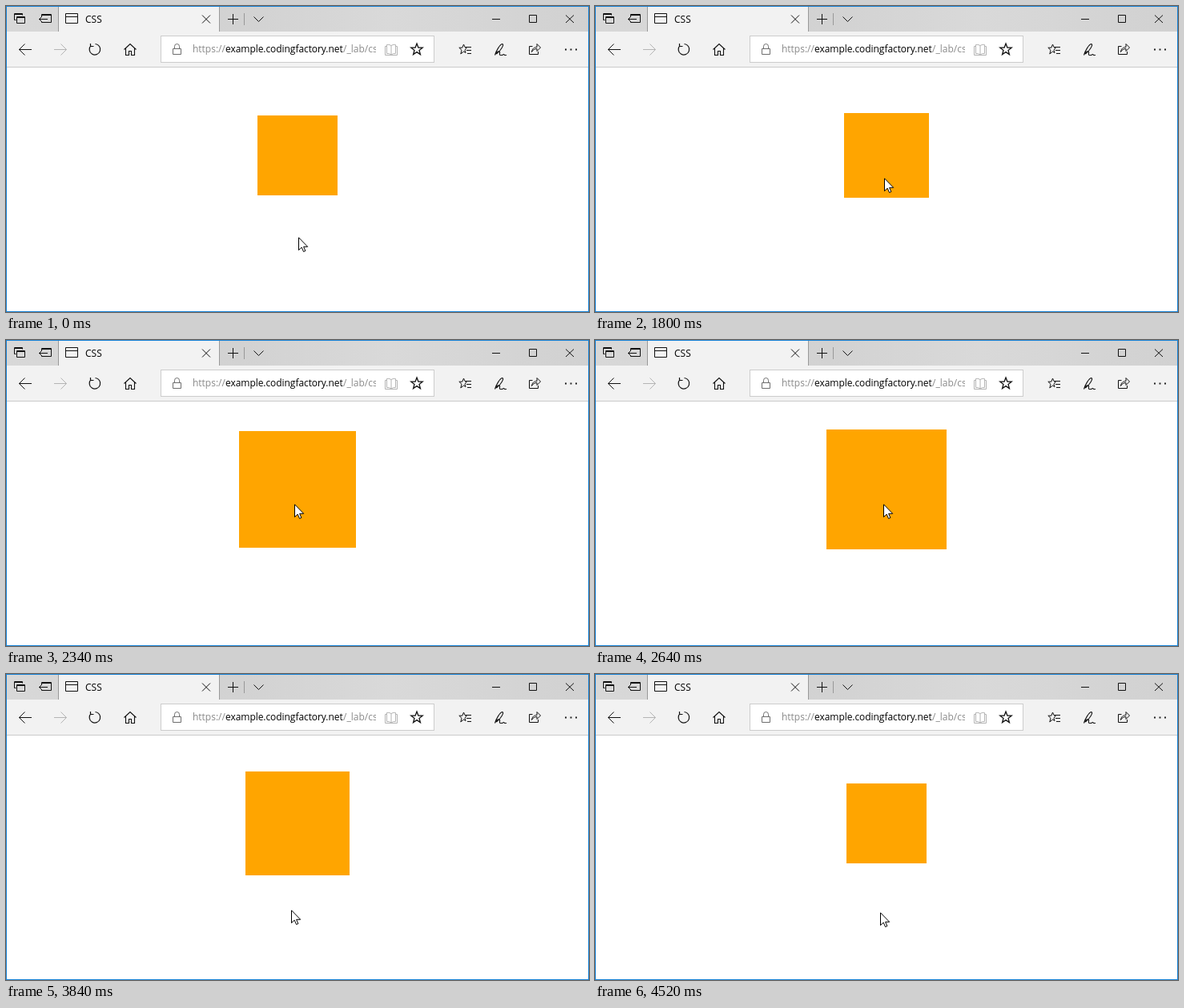
An HTML page for the animation above (4.6 s loop, 728 by 383 pixels).

```html
<!DOCTYPE html>
<html lang="en">
<head>
<meta charset="utf-8">
<title>CSS</title>
<style>
  html, body { margin: 0; width: 100%; height: 100%; overflow: hidden; background: #fff; }
  .stage { position: relative; width: 728px; height: 383px; overflow: hidden; }
  .stage > * { position: absolute; }
  .chrome { left: 0; top: 0; font: 12px "Open Sans", "Noto Sans", sans-serif; }
  .icon { fill: none; stroke: #111; stroke-width: 1; }
  .soft { stroke: #b4b4b4; }
  .mid { stroke: #6e6e6e; }
  .crisp { shape-rendering: crispEdges; }

  .square {
    left: 314px; top: 137px; width: 100px; height: 100px;
    background: orange;
    animation: grow 4.6s infinite;
  }
  .pointer { width: 14px; height: 20px; animation: move 4.6s linear infinite; }

  /* one-second ease in each direction, triggered by the pointer crossing the edge */
  @keyframes grow {
    0% { transform: none; }
    36.413% { transform: scale(1); animation-timing-function: ease; }
    58.152%, 78.326% { transform: scale(1.5); animation-timing-function: ease; }
    99.783%, 100% { transform: scale(1); }
  }
  @keyframes move {
    0%, 28.24% { left: 365px; top: 289px; }
    28.26% { left: 365px; top: 288px; animation-timing-function: ease-in-out; }
    42.609%, 67.17% { left: 360px; top: 205px; }
    73.913% { left: 359px; top: 243px; }
    78.37% { left: 358px; top: 266px; }
    83.478% { left: 356px; top: 295px; animation-timing-function: ease-out; }
    86.957%, 100% { left: 356px; top: 298px; }
  }
</style>
</head>
<body>
<div class="stage">
  <svg class="chrome" width="728" height="383" viewBox="0 0 728 383">
    <defs>
      <linearGradient id="bar">
        <stop offset="0" stop-color="#d8d8d8"/>
        <stop offset=".4" stop-color="#d2d2d2"/>
        <stop offset=".66" stop-color="#d9d9d9"/>
        <stop offset="1" stop-color="#d1d1d1"/>
      </linearGradient>
      <clipPath id="field"><rect x="230" y="40" width="232" height="28"/></clipPath>
    </defs>

    <g class="crisp">
      <rect width="728" height="383" fill="#fff"/>
      <rect width="728" height="32" fill="url(#bar)"/>
      <rect y="32" width="728" height="44" fill="#f2f2f2"/>
      <rect x="65" width="202" height="32" fill="#999"/>
      <rect x="66" width="200" height="32" fill="#f2f2f2"/>
      <rect y="76" width="728" height="1" fill="#cbcbcb"/>
      <rect x="193.5" y="37.5" width="341" height="33" fill="#fff" stroke="#ccc"/>
    </g>

    <!-- tab strip -->
    <g class="icon">
      <path d="M12.5 17.5H10.5V9.5H20.5V11.5M10 10.5H21M13.5 13.5H23.5V21.5H13.5ZM13 14.5H24"/>
      <path d="M44.5 14V10.5H56.5V20.5H44.5V19M44 11.5H57M41.5 16.5H52M44.5 13.5L41.5 16.5L44.5 19.5"/>
      <path d="M74.5 9.5H89.5V21.5H74.5ZM74 13.5H90"/>
      <path d="M245 11.5L255 21.5M255 11.5L245 21.5"/>
      <path d="M277 16.5H290M283.5 10V23"/>
      <path d="M297.5 9V24" stroke="#999"/>
      <path d="M309.5 13.5L315.5 19.5L321.5 13.5"/>
      <path d="M607 16.5H617M653.5 11.5H662.5V20.5H653.5ZM699 11.5L709 21M709 11.5L699 21"/>
    </g>
    <text x="99" y="21" fill="#000">CSS</text>

    <!-- navigation -->
    <g class="icon">
      <path d="M16.5 54.5H32M23.5 47.5L16.5 54.5L23.5 61.5"/>
      <path class="soft" d="M60 54.5H75.5M68.5 47.5L75.5 54.5L68.5 61.5"/>
      <path d="M106.2 49.4A6.8 6.8 0 1 0 111.5 47.5M105.5 47V50.5H109.5" stroke-width="1.2"/>
      <path d="M147.5 54.5L155 47.5L162.5 54.5M149.5 53V61.5H153.5V56.5H156.5V61.5H160.5V53" stroke-width="1.1"/>
      <path class="mid" d="M208.5 53.5H218.5V60.5H208.5ZM210.5 53V50.5A3 3 0 0 1 216.5 50.5V53"/>
      <path class="soft" d="M481 49.5V61.5M481 49.5Q477.5 47.5 475.5 48.5V59.5Q478.5 59 481 61Q483.5 59 486.5 59.5V48.5Q484.5 47.5 481 49.5M475 50.5H473.5V61.5H488.5V50.5H487"/>
      <path d="M513 47L514.9 52L520.2 52.2L516 55.5L517.4 60.6L513 57.6L508.6 60.6L510 55.5L505.8 52.2L511.1 52Z" stroke-width="1.3"/>
      <path d="M573 51.5H581M575 55.5H581M576 59.5H581M574 58.5L571.5 57L567.8 60L569 55.3L565.8 52.2H569.8L571.5 48L573 51.5L575 52.5L573 55.3Z"/>
      <path d="M610.5 61.5C612 56 617 48 619.5 47.5C622 47.5 620 52 617 55.5C614 59 612 60.5 611.5 59.5C613 57 616 56 616.5 57.5C617 59 615.5 61.5 617.5 61.5H620Q621.5 59.5 622.5 61.5H625" stroke-width="1.1"/>
      <path d="M657.5 50.5H653.5V60.5H664.5V57M656.5 57.5C657 53.5 659.5 51.5 663 51.5V47.5L667.5 52L663 56.5V53.5C660 53.5 658 55 656.5 57.5Z"/>
    </g>
    <path d="M698 53.5h2v2h-2zm6.5 0h2v2h-2zm6.5 0h2v2h-2z" fill="#222"/>
    <g clip-path="url(#field)" fill="#8a8a8a">
      <text x="233" y="58">https://</text>
      <text x="274" y="58" fill="#000" letter-spacing="-.06">example.codingfactory.net</text>
      <text x="421" y="58">/_lab/css</text>
    </g>
    <rect class="crisp" x=".5" y=".5" width="727" height="382" fill="none" stroke="#1883d7"/>
  </svg>

  <div class="square"></div>

  <svg class="pointer" viewBox="0 0 14 20">
    <path d="M.5 .8V16.6L4.2 13.1L6.6 18.5L8.9 17.5L6.6 12.3H11.7Z" fill="#fff" stroke="#000"/>
  </svg>
</div>
</body>
</html>
```
